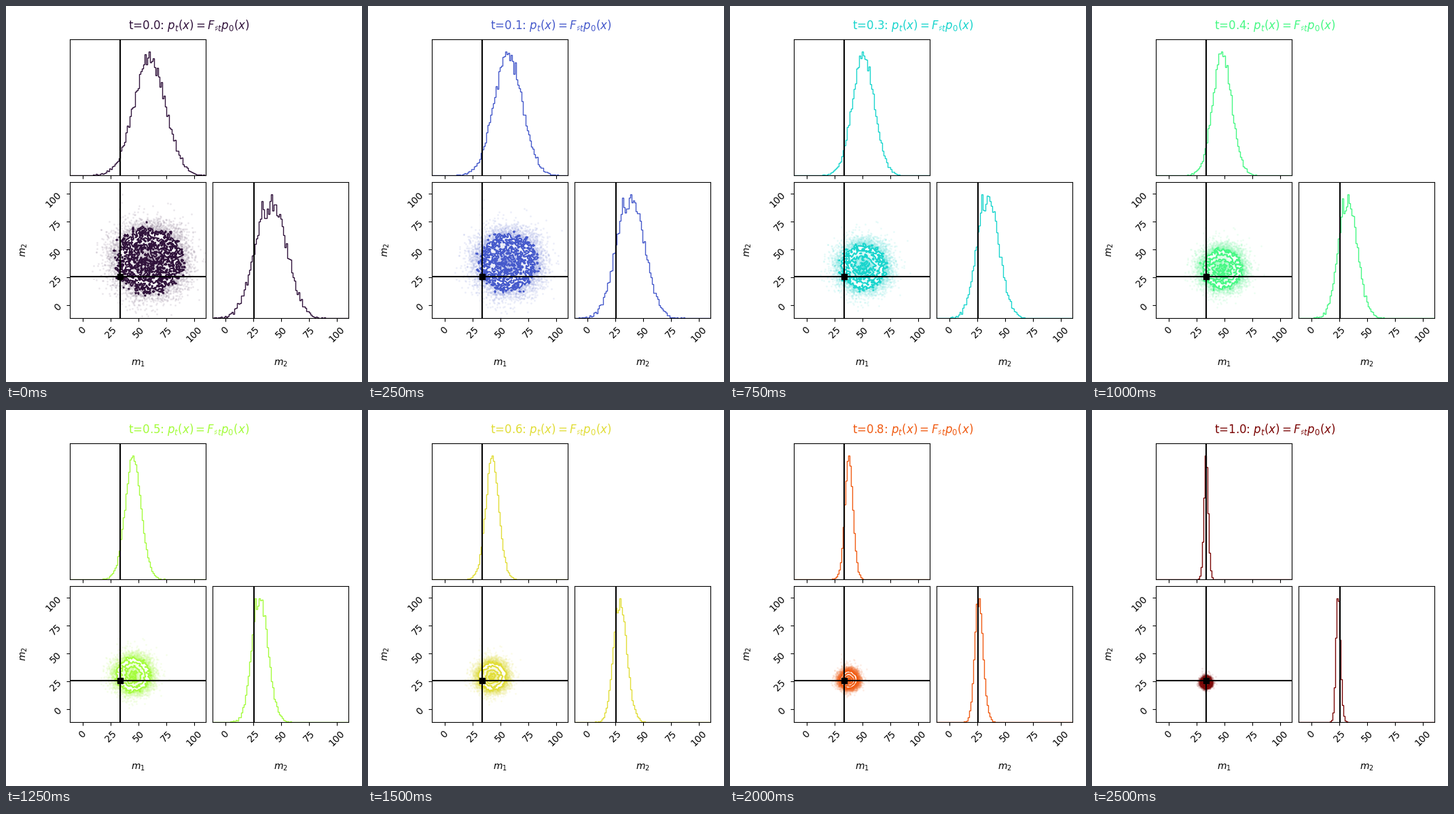
A matplotlib script for the animation above (2750 ms loop, 524 by 553 pixels).

```python
import numpy as np
import matplotlib
import matplotlib.pyplot as plt
from matplotlib.animation import FuncAnimation
from matplotlib.colors import LinearSegmentedColormap

W, H, DPI = 524, 553, 100
SIDE = 200
LO, HI = -11.5, 110.45
BINS = 100
STEPS = 11
TRUTH = (33.5, 25.6)
TICKS = [0, 25, 50, 75, 100]
LEVELS = 1 - np.exp(-0.5 * np.arange(0.5, 2.1, 0.5) ** 2)

rng = np.random.default_rng(12)
z1, z2 = rng.standard_normal((2, 16000))
# small shoulder left of the second marginal's peak
z2 -= 0.02 * np.exp(-((z2 + 0.42) / 0.16) ** 2)

edges = np.linspace(LO, HI, BINS + 1)
step = edges[1] - edges[0]
pad_centers = LO + step * (np.arange(-2, BINS + 2) + 0.5)

plt.rcParams["font.family"] = "DejaVu Sans"
fig = plt.figure(figsize=(W / DPI, H / DPI), dpi=DPI, facecolor="white")


def panel(left, top):
    ax = fig.add_axes([left / W, 1 - (top + SIDE) / H, SIDE / W, SIDE / H])
    ax.set_xlim(LO, HI)
    ax.set_xticks(TICKS)
    ax.tick_params(axis="x", labelrotation=45)
    return ax


def hist_panel(left, top, truth):
    ax = panel(left, top)
    ax.set_ylim(0, 1.1)
    ax.set_yticks([])
    stairs = ax.stairs(np.zeros(BINS), edges, lw=1)
    ax.axvline(truth, color="black", lw=1.5)
    return ax, stairs


ax1, hist1 = hist_panel(94, 49, TRUTH[0])
ax2, hist2 = hist_panel(304, 259, TRUTH[1])
ax1.tick_params(labelbottom=False)

joint = panel(94, 259)
joint.set_ylim(LO, HI)
joint.set_yticks(TICKS)
joint.tick_params(axis="y", labelrotation=45)
joint.set_ylabel("$m_2$")
joint.yaxis.set_label_coords(-0.3, 0.5)
for ax, label in ((joint, "$m_1$"), (ax2, "$m_2$")):
    ax.set_xlabel(label)
    ax.xaxis.set_label_coords(0.5, -0.3)

dots, = joint.plot([], [], "o", ms=2, mec="none", alpha=0.1, zorder=-1)
joint.axvline(TRUTH[0], color="black", lw=1.5, zorder=2.1)
joint.axhline(TRUTH[1], color="black", lw=1.5, zorder=2.1)
joint.plot(*TRUTH, "s", color="black", zorder=2.1)

title = fig.text(269 / W, 1 - 34 / H, "", fontsize=12, ha="center", va="baseline")
layers = []


def flow(t):
    """Samples carried from the wide start to the narrow end."""
    shrink = (1 - t) ** 1.2
    bend = t * (1 - t)
    tail1 = z1 + 0.02 * t * z1 ** 3
    tail2 = z2 + 0.02 * t * z2 ** 3 + 0.05 * t * (z2 ** 2 - 1)
    x = 59.7 - 26.3 * t - 6 * bend + (1.8 + 12.4 * shrink) * tail1
    y = 40.5 - 16.5 * t - 5 * bend + (1.9 + 11.9 * shrink) * tail2
    return x, y


def contour_levels(counts):
    """Counts that enclose the wanted shares of all samples."""
    ranked = np.sort(counts.ravel())[::-1]
    share = np.cumsum(ranked) / ranked.sum()
    values = []
    for level in LEVELS:
        inside = ranked[share <= level]
        values.append(inside[-1] if len(inside) else ranked[0])
    values = np.sort(values)
    while np.any(np.diff(values) == 0):
        values[np.where(np.diff(values) == 0)[0][0]] *= 1 - 1e-4
    return values


def draw_density(x, y, color):
    while layers:
        layers.pop().remove()
    counts = np.histogram2d(x, y, bins=[edges, edges])[0].T
    padded = np.pad(counts, 2)
    levels = contour_levels(counts)
    peak = counts.max()
    fade = LinearSegmentedColormap.from_list("fade", [color, (1, 1, 1, 0)])
    layers.append(joint.contourf(pad_centers, pad_centers, padded,
                                 [levels.min(), peak], colors=["white"],
                                 antialiased=False))
    layers.append(joint.pcolormesh(edges, edges, peak - counts, cmap=fade, zorder=1))
    layers.append(joint.contour(pad_centers, pad_centers, padded, levels,
                                colors=[color]))


def update(i):
    t = i / (STEPS - 1)
    color = matplotlib.colormaps["turbo"](t)
    x, y = flow(t)
    for stairs, values in ((hist1, x), (hist2, y)):
        counts = np.histogram(values, edges)[0]
        stairs.set_data(counts / counts.max())
        stairs.set_edgecolor(color)
    dots.set_data(x, y)
    dots.set_markerfacecolor(color)
    draw_density(x, y, color)
    title.set_text(rf"t={t:.1f}: $p_t(x) = F_{{\sharp t}}p_0(x)$")
    title.set_color(color)
    return []


anim = FuncAnimation(fig, update, frames=STEPS, interval=250, repeat=True,
                     repeat_delay=0)
plt.show()
```
